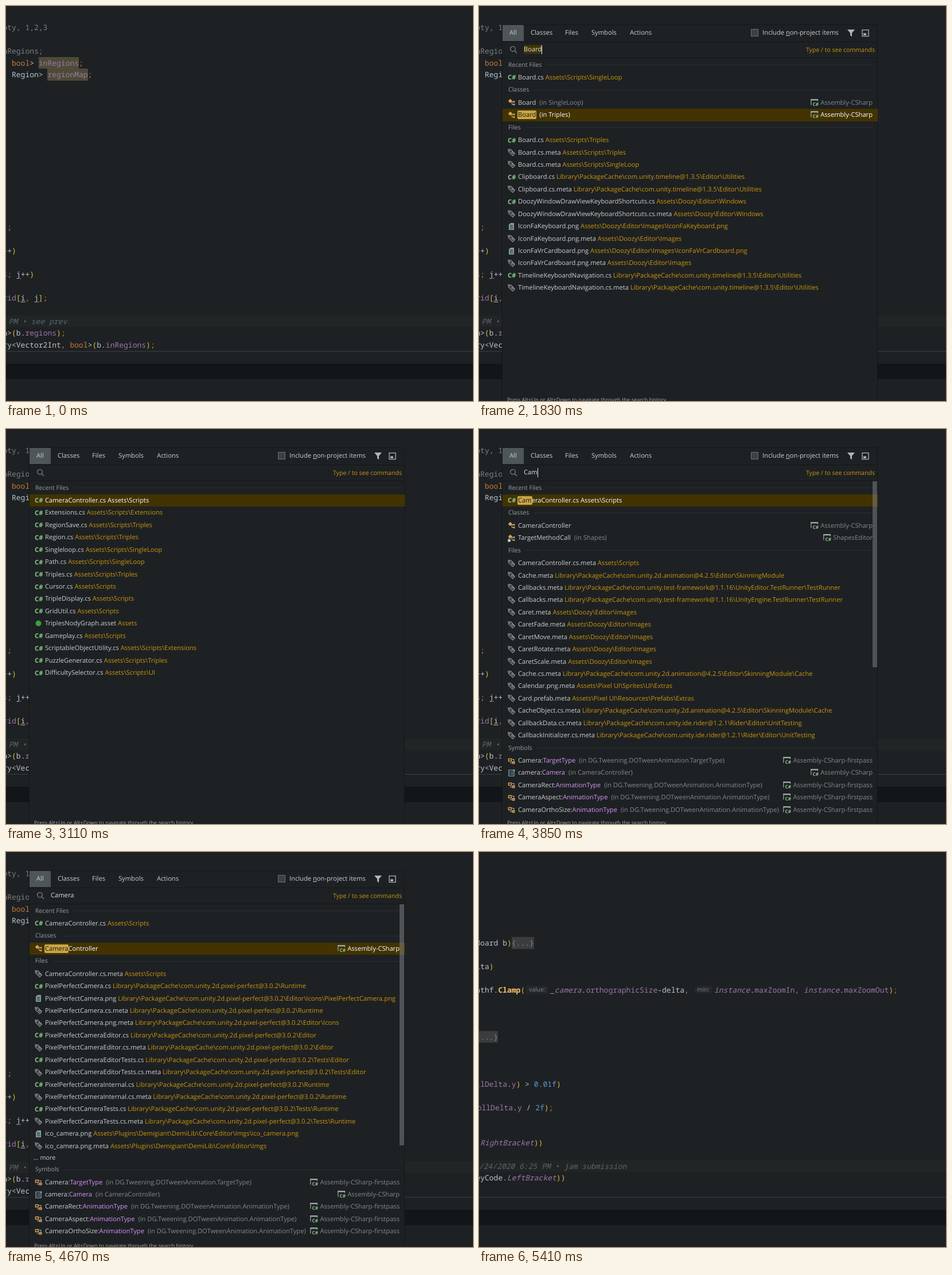
An HTML page for the animation above (8.1 s loop, 814 by 688 pixels).

```html
<!DOCTYPE html>
<html lang="en">
<head>
<meta charset="utf-8">
<title>Search everywhere</title>
<style>
html, body { margin: 0; width: 100%; height: 100%; overflow: hidden; background: #1e2123; }
#stage { position: relative; width: 814px; height: 688px; overflow: hidden; background: #1e2123;
  font: 11.16px "Open Sans", "Noto Sans", sans-serif; color: #cbcfd2; white-space: pre;
  text-rendering: geometricPrecision; }
#stage div, #stage p, .abs { position: absolute; margin: 0; }
#tabs, #tools, #results, #popup { left: 0; top: 0; }
svg { overflow: visible; }

/* editor */
.page { left: 0; width: 814px; }
.page p { height: 20.45px; font: 13px/20.45px "Noto Sans Mono", "DejaVu Sans Mono", monospace; }
.page p span { display: inline-block; height: 20.45px; vertical-align: top; }
.now { left: 0; width: 814px; height: 20.45px; background: #212526; }
.t { color: #b9c3ce; } .k { color: #c57a35; } .f { color: #9b76ab; } .g { color: #7b7e80; }
.u { color: #9b76ab; background: #4d4b36; }
.y { color: #e2b93b; } .n { color: #5899cd; }
.i { color: #9b76ab; font-style: italic; }
.a { color: #5d666b; font-style: italic; }
.m { color: #fbc469; font-weight: 600; }
.l { color: #b9c3ce; text-decoration: underline; text-underline-offset: 2px; }
.x { color: #85888a; background: #3a3c3d; }
.page .hint { height: 14px; font-size: 10.4px; line-height: 14px; text-align: center;
  color: #83878a; background: #25282a; border-radius: 3px; }

/* search window */
#box { left: 40px; top: 32px; box-sizing: border-box; background: #1e2123; border: 1px solid #141719; }
.label { height: 16px; line-height: 16px; }
.list { left: 41px; top: 91.6px; width: 654px; height: 585.4px; overflow: hidden; }
.list section { position: relative; height: 21.45px; line-height: 21.45px; }
.list .head { display: flex; align-items: center; height: 22.4px; line-height: 22.4px;
  padding: 0 8px 0 10px; font-size: 10.6px; color: #9a9ea1; }
.head hr { flex: 1; height: 1px; margin: 0 0 0 9px; border: 0; background: #2b2f31; }
.list .more { height: 19px; line-height: 19px; padding-left: 7px; font-size: 10.8px; }
.row .name { position: absolute; left: 27px; }
.row .icon { position: absolute; left: 9px; top: 3.5px; }
.row .mod { position: absolute; right: 9px; color: #85898c; }
.mod svg { vertical-align: -3px; margin-right: 3px; }
.path { color: #c8950f; } .type { color: #d694f8; }
.in { margin-left: 6px; color: #85898c; }
.on { background: #423300; }
.on, .on .path, .on .in, .on .mod { color: #fff; }
.hit { background: #c9a544; color: #1c1a12; border-radius: 2px; padding: 0 1px; margin: 0 -1px; }
.mark { background: #423400; }
.mark, .typed { display: inline-block; height: 15px; line-height: 15px; vertical-align: top; color: #dde0e2; }
.caret { display: inline-block; width: 1px; height: 16px; background: #e4e6e8; vertical-align: top; }
</style>
</head>
<body>
<svg width="0" height="0" style="position:absolute">
  <symbol id="cs" viewBox="0 0 14 14"><text x="0" y="11.3" font-size="11.2" font-weight="700" fill="#86c98a">C#</text></symbol>
  <symbol id="tag" viewBox="0 0 14 14"><g fill="none" stroke="#989c9f" stroke-width="1.1"><path d="M1 1.5l4.5.3 7 7.2-3.7 3.7-7.3-7z"/><path d="M5.5 6l3.8 3.8M7 4.8l3.7 3.8"/><circle cx="3.6" cy="4" r=".8"/></g></symbol>
  <symbol id="png" viewBox="0 0 14 14"><path d="M5 1h6v12H2V4z" fill="#8f999f"/><path d="M4 5h5M4 7h5" stroke="#23282a"/><path d="M3.5 8.5h6v3h-6z" fill="#2f7a67"/></symbol>
  <symbol id="asset" viewBox="0 0 14 14"><circle cx="6.5" cy="6.5" r="5" fill="#33a23d"/></symbol>
  <symbol id="class" viewBox="0 0 14 14"><path d="M4.5.8L8 4.2 4.2 8 .8 4.6z" fill="#e0a050"/><path d="M6 5.5h4M7.5 5.5v5H10" fill="none" stroke="#b9bdc0"/><path d="M11 3.7l2 2-2 2-2-2zM11 8.6l2 2-2 2-2-2z" fill="#e0a050"/></symbol>
  <symbol id="field" viewBox="0 0 14 14"><path d="M1 6.8L8.5 2.6 12.8 4v3.6L5.2 11.6 1 10z" fill="#4a94cf"/><path d="M1 6.8L8.5 2.6 12.8 4 5.2 8.2z" fill="#84c1ee"/></symbol>
  <symbol id="method" viewBox="0 0 14 14"><path d="M6.8 1.2l5 2.3v6l-5 2.6-5-2.6v-6z" fill="#9063bd"/><path d="M6.8 1.2l5 2.3-5 2.4-5-2.4z" fill="#c79be8"/></symbol>
  <symbol id="lock" viewBox="0 0 14 14"><path d="M-.3 8.2h6v5.6h-6z" fill="#1e2123"/><path d="M.3 10h4.6v3.4H.3z" fill="#d5d8da"/><path d="M1.3 10V8.6h2.6V10" fill="none" stroke="#d5d8da"/></symbol>
  <symbol id="enum" viewBox="0 0 14 14"><path d="M1.5 3.5h5v4h-5z" fill="none" stroke="#e0a050" stroke-width="1.5"/><path d="M8 4.5h3V8M7 10.5H4" fill="none" stroke="#b9bdc0"/><path d="M7.5 8h5v4.4h-5z" fill="#e0a050"/><path d="M9 10.2h2" stroke="#23282a"/></symbol>
  <symbol id="prop" viewBox="0 0 14 14"><path d="M2 2h9v10.5H2z" fill="none" stroke="#8fa9bb" stroke-width="1.2"/><path d="M3.8 5h1.4m1 0h3M3.8 7.4h1.4m1 0h3M3.8 9.8h1.4m1 0h3" stroke="#79b7df"/><path d="M8.5 2.5h4m-1.8-1.8l2 1.8-2 1.8" fill="none" stroke="#71c07a"/></symbol>
  <symbol id="asm" viewBox="0 0 14 14"><path d="M.8 11.5V1.8h11.7v3" fill="none" stroke="#a4a9ac" stroke-width="1.2"/><path d="M.3 1.2h12.7v2.2H.3z" fill="#a4a9ac"/><text x="3.6" y="12.6" font-size="8.2" font-weight="700" fill="#86c98a">C#</text></symbol>
</svg>
<div id="stage">
  <div class="page" id="page0" style="top:27.45px"></div>
  <div class="page" id="page1" style="top:148.45px"></div>
  <div style="left:0;top:601px;width:814px;height:1px;background:#3b3f40"></div>
  <div style="left:0;top:623px;width:814px;height:27px;background:#121618"></div>
  <div id="popup" style="width:814px;height:688px">
    <div id="box"></div>
    <div style="left:41px;top:33px;width:37px;height:28px;background:#4e5658"></div>
    <div id="tabs"></div>
    <div id="rule" style="left:41px;top:62px;height:1px;background:#141719"></div>
    <div id="rule2" style="left:41px;top:90px;height:1px;background:#141719"></div>
    <svg class="abs" style="left:53px;top:69px" width="14" height="14" fill="none" stroke="#85898c" stroke-width="1.2"><circle cx="6" cy="5.8" r="4.3"/><path d="M9.2 9l3.8 3.8"/></svg>
    <div id="tools">
      <div style="left:474px;top:40px;width:11px;height:11px;border:1px solid #6b7072;background:#3c4143"></div>
      <div class="label" style="left:494px;top:39px">Include <u>n</u>on-project items</div>
      <svg class="abs" style="left:642px;top:41px" width="40" height="13" fill="#b0b4b6"><path d="M0 0h13L8 6v6.5L5 10V6z"/><path d="M26 .6h11v11H26z" fill="none" stroke="#b0b4b6" stroke-width="1.3"/><path d="M28 6.5h5v3.5h-5z"/></svg>
      <div class="label path" style="left:570px;top:69px;font-size:10.55px">Type / to see commands</div>
    </div>
    <div id="query" style="left:78px;top:68px;height:16px"></div>
    <div id="results"></div>
  </div>
</div>
<script>
const $ = id => document.getElementById(id);
const esc = s => s.replace(/</g, '&lt;');

// "~x" starts a run of text in style x
const code = (n, x, s) => `<p style="left:${x}px;top:${n * 20.45}px">` +
  s.split('~').slice(1).map(r => `<span class="${r[0]}">${esc(r.slice(1))}</span>`).join('') + '</p>';
const now = n => `<div class="now" style="top:${n * 20.45}px"></div>`;
const hint = (x, w, s) => `<div class="hint" style="left:${x}px;top:84.5px;width:${w}px">${s}</div>`;

$('page0').innerHTML = now(25) + [
  [0, -5.6, '~gpty, 1,2,3'],
  [2, -5.6, '~gnRegions;'],
  [3, 10, '~kbool~t> ~uinRegions~k;'],
  [4, 10, '~tRegion> ~uregionMap~k;'],
  [17, -5.6, '~y)~k;'],
  [19, -5.6, '~t++~y)'],
  [21, -5.6, '~fs~k; ~lj~t++~y)'],
  [23, -5.6, '~frid~y[~li~k, ~lj~y]~k;'],
  [25, 4.8, '~aPM • see prev'],
  [26, -5.6, '~tn>~y(~tb.~fregions~y)~k;'],
  [27, -5.6, '~try<Vector2Int~k, bool~t>~y(~tb.~finRegions~y)~k;']
].map(a => code(...a)).join('');

$('page1').innerHTML = now(19) + [
  [0, -5.6, '~tBoard b~y)~x{...}'],
  [2, -5.6, '~tlta~y)'],
  [4, -5.6, '~tathf.~mClamp~y('],
  [4, 124, '~i_camera~t.~forthographicSize~t-delta~k,'],
  [4, 410, '~iinstance~t.~fmaxZoomIn~k, ~iinstance~t.~fmaxZoomOut~y)~k;'],
  [8, -5.6, '~x{...}'],
  [12, -5.6, '~fllDelta~t.~fy~y) ~t> ~n0.01f~y)'],
  [14, -3.3, '~follDelta~t.~fy ~t/ ~n2f~y)~k;'],
  [17, 2.2, '~iRightBracket~y))'],
  [19, 0, '~a/24/2020 6:25 PM • jam submission'],
  [20, -5.6, '~teyCode.~iLeftBracket~y))']
].map(a => code(...a)).join('') + hint(83, 37, 'value:') + hint(376, 30, 'min:');

$('tabs').innerHTML = [[53, 'All'], [90, 'Classes'], [150, 'Files'], [196, 'Symbols'], [263, 'Actions']]
  .map(([x, s]) => `<div class="label" style="left:${x}px;top:39px">${s}</div>`).join('');

// "# heading", "file|path" or "icon|name|place|module"; ~ is the package cache, + is a shared module name
const lines = s => s.trim().replace(/~/g, 'Library\\PackageCache\\com.unity.')
  .replace(/\+/g, 'Assembly-CSharp').split('\n');
const tween = String.raw`# Symbols
enum|Camera:TargetType|DG.Tweening.DOTweenAnimation.TargetType|+-firstpass
prop|camera:Camera|CameraController|+
enum|CameraRect:AnimationType|DG.Tweening.DOTweenAnimation.AnimationType|+-firstpass
enum|CameraAspect:AnimationType|DG.Tweening.DOTweenAnimation.AnimationType|+-firstpass
enum|CameraOrthoSize:AnimationType|DG.Tweening.DOTweenAnimation.AnimationType|+-firstpass`;
const lists = {
  board: lines(String.raw`# Recent Files
Board.cs|Assets\Scripts\SingleLoop
# Classes
class|Board|SingleLoop|+
class|Board|Triples|+
# Files
Board.cs|Assets\Scripts\Triples
Board.cs.meta|Assets\Scripts\Triples
Board.cs.meta|Assets\Scripts\SingleLoop
Clipboard.cs|~timeline@1.3.5\Editor\Utilities
Clipboard.cs.meta|~timeline@1.3.5\Editor\Utilities
DoozyWindowDrawViewKeyboardShortcuts.cs|Assets\Doozy\Editor\Windows
DoozyWindowDrawViewKeyboardShortcuts.cs.meta|Assets\Doozy\Editor\Windows
IconFaKeyboard.png|Assets\Doozy\Editor\Images\IconFaKeyboard.png
IconFaKeyboard.png.meta|Assets\Doozy\Editor\Images
IconFaVrCardboard.png|Assets\Doozy\Editor\Images\IconFaVrCardboard.png
IconFaVrCardboard.png.meta|Assets\Doozy\Editor\Images
TimelineKeyboardNavigation.cs|~timeline@1.3.5\Editor\Utilities
TimelineKeyboardNavigation.cs.meta|~timeline@1.3.5\Editor\Utilities
# Symbols
field|onBoard:Board|SingleLoop.Path|+
method|GetBoard():Board|DefaultNamespace.Gameplay|+
field lock|activeBoard:Board|DefaultNamespace.Gameplay|+
method|GenerateBoard():Board|Triples.Difficulty|+
field lock|generatedBoard:Board|Triples.PuzzleGenerator|+
method lock|CreateBoardObjects(Board):void|DefaultNamespace.Gameplay|+
method lock|CreateBoardObjects(Board):void|GameGenerator|+`),
  recent: lines(String.raw`# Recent Files
CameraController.cs|Assets\Scripts
Extensions.cs|Assets\Scripts\Extensions
RegionSave.cs|Assets\Scripts\Triples
Region.cs|Assets\Scripts\Triples
Singleloop.cs|Assets\Scripts\SingleLoop
Path.cs|Assets\Scripts\SingleLoop
Triples.cs|Assets\Scripts\Triples
Cursor.cs|Assets\Scripts
TripleDisplay.cs|Assets\Scripts
GridUtil.cs|Assets\Scripts
TriplesNodyGraph.asset|Assets
Gameplay.cs|Assets\Scripts
ScriptableObjectUtility.cs|Assets\Scripts\Extensions
PuzzleGenerator.cs|Assets\Scripts\Triples
DifficultySelector.cs|Assets\Scripts\UI`),
  ca: lines(String.raw`# Recent Files
CameraController.cs|Assets\Scripts
# Classes
class|CameraController||+
class lock|TargetMethodCall|Shapes|ShapesEditor
# Files
CameraController.cs.meta|Assets\Scripts
Cache.meta|~2d.animation@4.2.5\Editor\SkinningModule
Callbacks.meta|~test-framework@1.1.16\UnityEditor.TestRunner\TestRunner
Callbacks.meta|~test-framework@1.1.16\UnityEngine.TestRunner\TestRunner
Caret.meta|Assets\Doozy\Editor\Images
CaretFade.meta|Assets\Doozy\Editor\Images
CaretMove.meta|Assets\Doozy\Editor\Images
CaretRotate.meta|Assets\Doozy\Editor\Images
CaretScale.meta|Assets\Doozy\Editor\Images
Cache.cs.meta|~2d.animation@4.2.5\Editor\SkinningModule\Cache
Calendar.png.meta|Assets\Pixel UI\Sprites\UI\Extras
Card.prefab.meta|Assets\Pixel UI\Resources\Prefabs\Extras
CacheObject.cs.meta|~2d.animation@4.2.5\Editor\SkinningModule\Cache
CallbackData.cs.meta|~ide.rider@1.2.1\Rider\Editor\UnitTesting
CallbackInitializer.cs.meta|~ide.rider@1.2.1\Rider\Editor\UnitTesting
` + tween),
  camera: lines(String.raw`# Recent Files
CameraController.cs|Assets\Scripts
# Classes
class|CameraController||+
# Files
CameraController.cs.meta|Assets\Scripts
PixelPerfectCamera.cs|~2d.pixel-perfect@3.0.2\Runtime
PixelPerfectCamera.png|~2d.pixel-perfect@3.0.2\Editor\Icons\PixelPerfectCamera.png
PixelPerfectCamera.cs.meta|~2d.pixel-perfect@3.0.2\Runtime
PixelPerfectCamera.png.meta|~2d.pixel-perfect@3.0.2\Editor\Icons
PixelPerfectCameraEditor.cs|~2d.pixel-perfect@3.0.2\Editor
PixelPerfectCameraEditor.cs.meta|~2d.pixel-perfect@3.0.2\Editor
PixelPerfectCameraEditorTests.cs|~2d.pixel-perfect@3.0.2\Tests\Editor
PixelPerfectCameraEditorTests.cs.meta|~2d.pixel-perfect@3.0.2\Tests\Editor
PixelPerfectCameraInternal.cs|~2d.pixel-perfect@3.0.2\Runtime
PixelPerfectCameraInternal.cs.meta|~2d.pixel-perfect@3.0.2\Runtime
PixelPerfectCameraTests.cs|~2d.pixel-perfect@3.0.2\Tests\Runtime
PixelPerfectCameraTests.cs.meta|~2d.pixel-perfect@3.0.2\Tests\Runtime
ico_camera.png|Assets\Plugins\Demigiant\DemiLib\Core\Editor\Imgs\ico_camera.png
ico_camera.png.meta|Assets\Plugins\Demigiant\DemiLib\Core\Editor\Imgs
... more
` + tween)
};
const barEnd = { board: 488, ca: 415, camera: 511 };
const fileIcon = { cs: 'cs', meta: 'tag', png: 'png', asset: 'asset' };

const icon = (names, cls = '') => `<svg class="${cls}" width="14" height="14">` +
  names.split(' ').map(n => `<use href="#${n}"/>`).join('') + '</svg>';

function row(s, on, hit) {
  const p = s.split('|'), file = p.length === 2;
  const [kind, name] = file ? [fileIcon[p[0].split('.').pop()], p[0]] : p;
  const [id, type] = name.split(':');
  let text = on && hit ? `<span class="hit">${hit}</span>` + id.slice(hit.length) : id;
  if (type) text += `:<span class="type">${type}</span>`;
  if (file) text += ` <span class="path">${p[1]}</span>`;
  else if (p[2]) text += `<span class="in">(in ${p[2]})</span>`;
  const mod = file ? '' : `<span class="mod">${icon('asm')}${p[3]}</span>`;
  return `<section class="row${on ? ' on' : ''}">${icon(kind, 'icon')}<span class="name">${text}</span>${mod}</section>`;
}

function results({ list, parts, sel, hit }) {
  if (!list) return '';
  let heads = 0, n = 0, html = '';
  for (const s of lists[list]) {
    if (s[0] === '#') {
      if (++heads > parts) break;
      html += `<section class="head">${s.slice(2)}<hr></section>`;
    } else if (s[0] === '.') html += `<section class="more">${s}</section>`;
    else html += row(s, n++ === sel, hit);
  }
  html = `<div class="list">${html}</div>`;
  if (barEnd[list] && parts > 3)
    html += `<div style="left:686px;top:91px;width:8px;height:${barEnd[list] - 91}px;background:rgba(150,154,156,.42)"></div>`;
  return html + '<div style="left:49px;top:679px;font-size:9.25px;line-height:14px;color:#a3a7a9">' +
    'Press Alt+Up or Alt+Down to navigate through the search history</div>';
}

// each step changes only what it names
const steps = [
  [0, { page: 0, open: 0, width: 654, list: '', parts: 4, query: 'Board', marked: 1, caret: 1, sel: 2, hit: 'Board' }],
  [1660, { open: 1 }],
  [1740, { width: 656, list: 'board', parts: 2 }],
  [1830, { parts: 3 }],
  [1920, { parts: 4 }],
  [2100, { caret: 0 }],
  [2660, { query: '', marked: 0, caret: 1 }],
  [2750, { list: '' }],
  [2830, { list: 'recent', sel: 0, hit: '' }],
  [3110, { caret: 0 }],
  [3570, { query: 'C', caret: 1 }],
  [3760, { query: 'Ca' }],
  [3850, { query: 'Cam', list: 'ca', hit: 'Cam' }],
  [3940, { query: 'Came', hit: 'Came' }],
  [4030, { query: 'Camer', hit: 'Camer' }],
  [4120, { query: 'Camera', hit: 'Camera' }],
  [4220, { list: 'camera' }],
  [4580, { caret: 0 }],
  [4670, { sel: 1 }],
  [4950, { sel: 0 }],
  [5040, { caret: 1 }],
  [5410, { page: 1, open: 0 }]
];
const states = [];
steps.forEach(([, s], i) => states.push({ ...states[i - 1], ...s }));

function draw(s) {
  $('page0').style.display = s.page ? 'none' : '';
  $('page1').style.display = s.page ? '' : 'none';
  $('popup').style.display = s.open ? '' : 'none';
  $('box').style.width = s.width - 1 + 'px';
  $('box').style.height = (s.list ? 680 : 59) + 'px';
  $('rule').style.width = $('rule2').style.width = s.width - 3 + 'px';
  $('tools').style.left = s.width - 656 + 'px';
  $('query').innerHTML = `<span class="${s.marked ? 'mark' : 'typed'}">${s.query}</span>` +
    (s.caret ? '<span class="caret"></span>' : '');
  $('results').innerHTML = results(s);
}

const start = performance.now();
let shown = -1;
function tick() {
  const t = (performance.now() - start) % 8100;
  const k = steps.findLastIndex(s => s[0] <= t);
  if (k !== shown) draw(states[shown = k]);
  requestAnimationFrame(tick);
}
tick();
</script>
</body>
</html>
```
